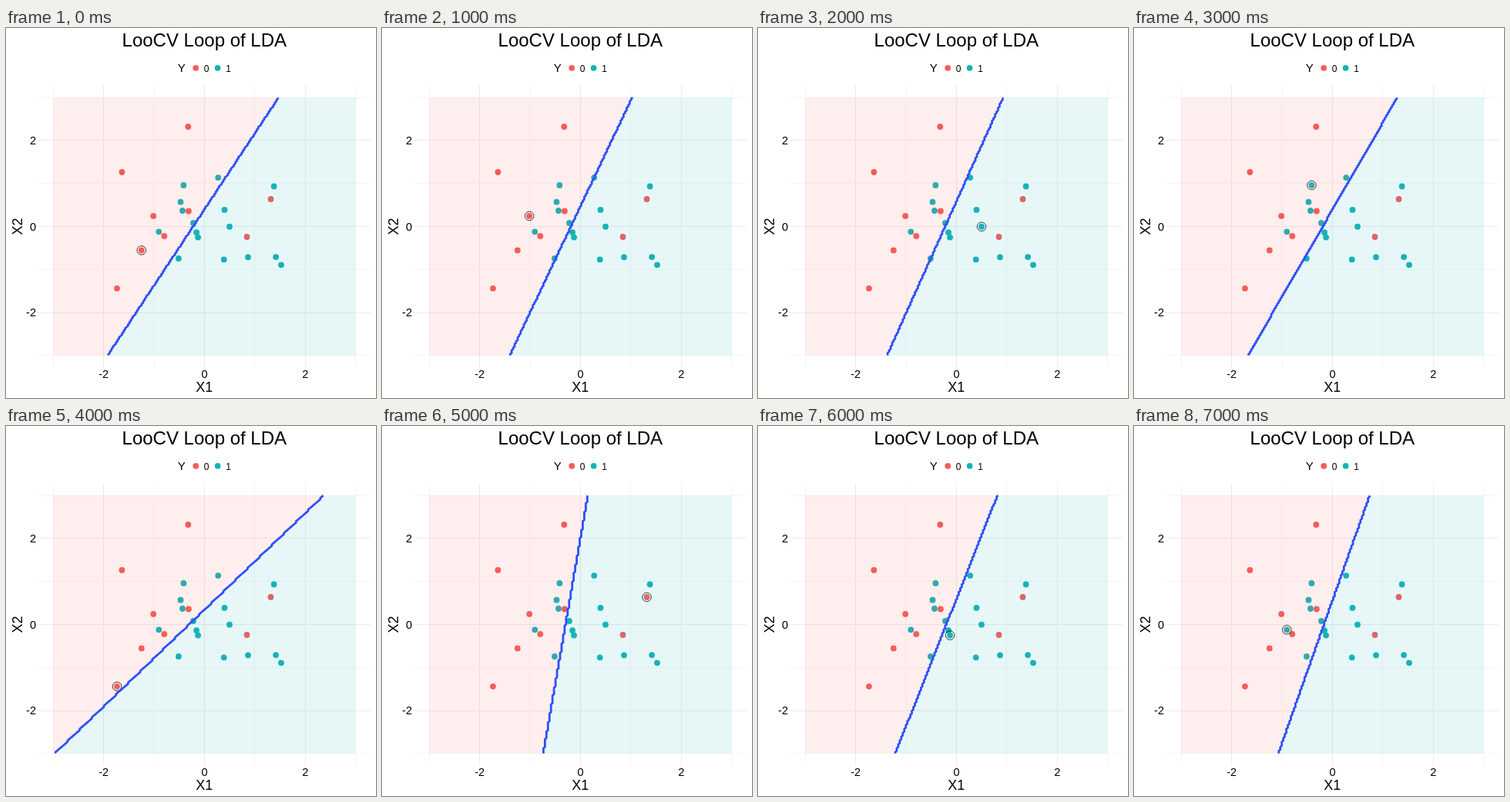
Animation of 480x480 px, one loop 8000 ms. Source, as an HTML page with a canvas:

```html
<!DOCTYPE html>
<html lang="en">
<head>
<meta charset="utf-8">
<title>LooCV Loop of LDA</title>
<style>
html, body { margin: 0; width: 100%; height: 100%; overflow: hidden; background: #fff; }
canvas { display: block; width: 480px; height: 480px; }
</style>
</head>
<body>
<canvas id="stage" width="480" height="480"></canvas>
<script>
const ctx = document.getElementById('stage').getContext('2d');
const FONT = '"Liberation Sans", Arial, sans-serif';
const RED = '#f35e5a', TEAL = '#17b3b7', BLUE = '#2f50f5';
const STEP_MS = 1000;
const CELLS = 200;

const px = x => 257.5 + 65.43 * x;
const py = y => 257.5 - 55.77 * y;
const BOX = { left: px(-3), right: px(3), top: py(3), bottom: py(-3) };

// Observations in stage coordinates; LDA does not depend on the scale of the axes
const reds = [[236.3, 128], [150.4, 187], [191.2, 243.9], [236.9, 237.5], [205.3, 269.9],
  [175.8, 288.4], [144, 337.8], [343.5, 222], [312.5, 271]];
const teals = [[230.4, 204], [226.5, 225.7], [229, 237], [243, 253], [247.1, 265.2],
  [249.1, 271.6], [198.3, 264.3], [223.9, 299], [275.2, 194.1], [283.5, 235.9],
  [290, 257.7], [282.7, 300.3], [314, 297.3], [350.1, 297.1], [357, 307.3], [347.6, 205.5]];
const leftOut = [reds[5], reds[2], teals[10], teals[0], reds[6], reds[7], teals[5], teals[6]];

const sum = (points, f) => points.reduce((total, p) => total + f(p), 0);

function summarize(points) {
  const mx = sum(points, p => p[0]) / points.length;
  const my = sum(points, p => p[1]) / points.length;
  return {
    mx, my,
    xx: sum(points, p => (p[0] - mx) ** 2),
    yy: sum(points, p => (p[1] - my) ** 2),
    xy: sum(points, p => (p[0] - mx) * (p[1] - my))
  };
}

// Decision line of LDA with equal priors, as x for a given y
function fitWithout(point) {
  const [a, b] = [reds, teals].map(group => summarize(group.filter(p => p !== point)));
  const xx = a.xx + b.xx, yy = a.yy + b.yy, xy = a.xy + b.xy;
  const dx = b.mx - a.mx, dy = b.my - a.my;
  const slope = (xx * dy - xy * dx) / (yy * dx - xy * dy);
  return y => (a.mx + b.mx) / 2 - slope * (y - (a.my + b.my) / 2);
}

// Contour of a two-class raster: the line snapped to cell edges on each row
function boundary(lineX) {
  const cell = (BOX.right - BOX.left) / CELLS;
  return Array.from({ length: CELLS + 1 }, (_, row) => {
    const y = BOX.bottom + (BOX.top - BOX.bottom) * row / CELLS;
    const column = Math.floor((lineX(y) - BOX.left) / cell);
    return [BOX.left + (column + 0.5) * cell, y];
  });
}

function circle([x, y], r) {
  ctx.beginPath();
  ctx.arc(x, y, r, 0, 2 * Math.PI);
}

function dot(point, color) {
  ctx.fillStyle = color;
  circle(point, 3.9);
  ctx.fill();
}

function label(text, x, y, size, align = 'center') {
  ctx.font = `${size}px ${FONT}`;
  ctx.textAlign = align;
  ctx.fillStyle = '#000';
  ctx.fillText(text, x, y);
}

function drawGrid() {
  for (let v = -3; v <= 3; v++) {
    ctx.fillStyle = v % 2 ? '#f6f6f6' : '#ebebeb';
    ctx.fillRect(Math.round(px(v) - 0.5), 74, 1, 367);
    ctx.fillRect(42, Math.round(py(v) - 0.5), 431, 1);
  }
}

function drawLabels() {
  label('LooCV Loop of LDA', 257.3, 24, 24);
  label('Y', 227.7, 57, 15);
  dot([246.2, 51.8], RED);
  dot([274.6, 51.8], TEAL);
  label('0', 260, 57, 12);
  label('1', 288.5, 57, 12);
  for (const v of [-2, 0, 2]) {
    label(v, px(v), 454, 14.5);
    label(v, 39, py(v) + 5, 14.5, 'right');
  }
  label('X1', 257.3, 472, 18);
  ctx.save();
  ctx.translate(21, 257.5);
  ctx.rotate(-Math.PI / 2);
  label('X2', 0, 0, 18);
  ctx.restore();
}

function trace(points) {
  ctx.beginPath();
  points.forEach(([x, y]) => ctx.lineTo(x, y));
}

function shade(line, edge, color) {
  trace([...line, [edge, BOX.top], [edge, BOX.bottom]]);
  ctx.globalAlpha = 0.1;
  ctx.fillStyle = color;
  ctx.fill();
  ctx.globalAlpha = 1;
}

function draw(time) {
  const point = leftOut[Math.floor(time / STEP_MS) % leftOut.length];
  const line = boundary(fitWithout(point));

  ctx.fillStyle = '#fff';
  ctx.fillRect(0, 0, 480, 480);
  drawGrid();
  reds.forEach(p => dot(p, RED));
  teals.forEach(p => dot(p, TEAL));

  circle(point, 5.8);
  ctx.lineWidth = 0.8;
  ctx.strokeStyle = '#000';
  ctx.stroke();

  shade(line, BOX.left, RED);
  shade(line, BOX.right, TEAL);

  trace(line);
  ctx.lineWidth = 2.8;
  ctx.lineJoin = 'round';
  ctx.strokeStyle = BLUE;
  ctx.stroke();
  drawLabels();
}

const start = performance.now();
function tick() {
  draw(performance.now() - start);
  requestAnimationFrame(tick);
}
tick();
</script>
</body>
</html>
```
